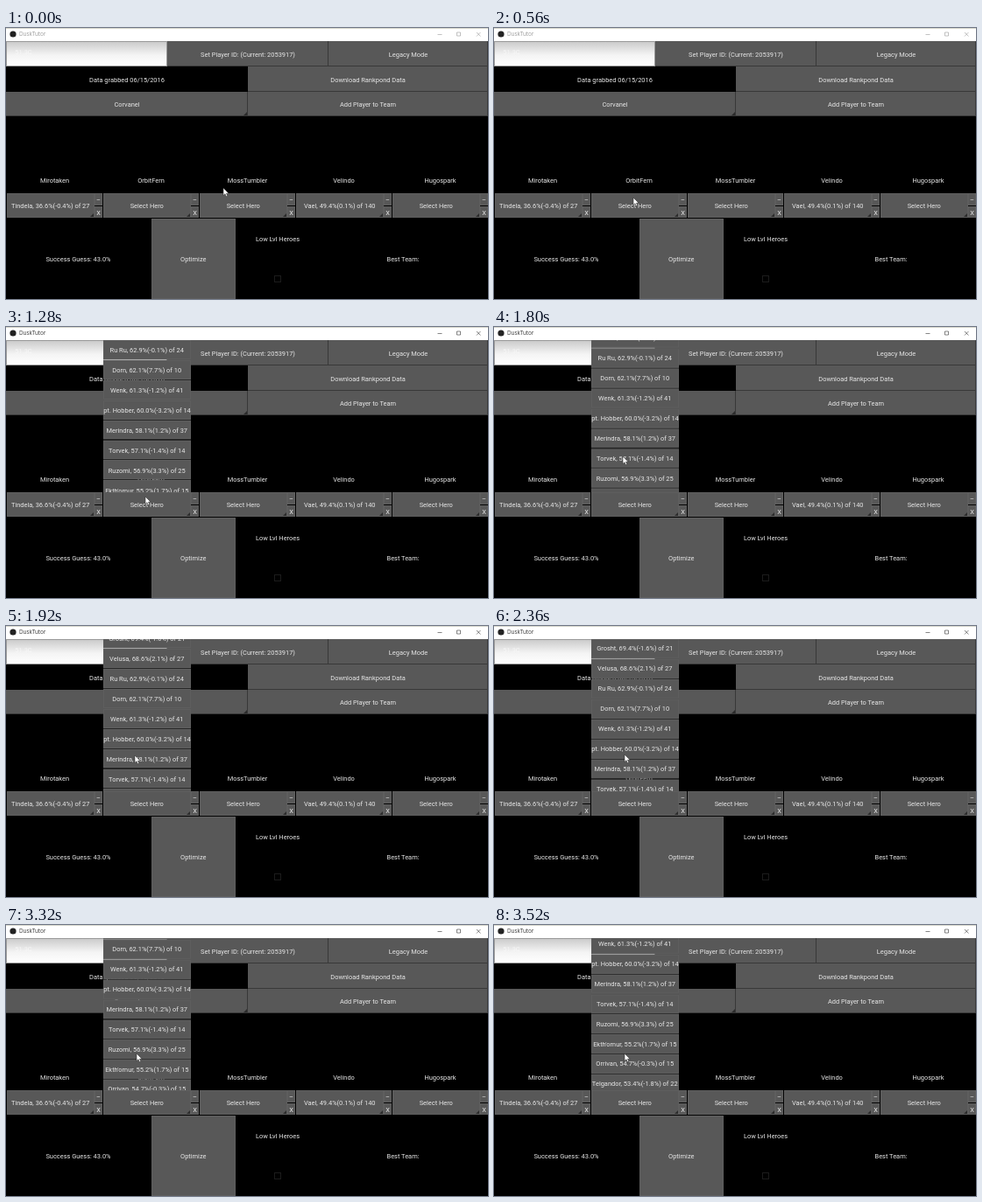
Animation of 550x310 px, one loop 3720 ms. Source, as an HTML page:

```html
<!DOCTYPE html>
<html lang="en">
<head>
<meta charset="utf-8">
<title>Team picker</title>
<style>
  html, body { margin: 0; width: 100%; height: 100%; overflow: hidden; background: #000; }
  #stage { position: relative; width: 550px; height: 310px; overflow: hidden; background: #000;
    color: #e8e8e8; font: 7.45px/1 Roboto, sans-serif; }
  #stage div { position: absolute; box-sizing: border-box; }
  .label, .button { display: flex; align-items: center; justify-content: center;
    white-space: nowrap; overflow: hidden; }
  .label span, .button span { transform: translateY(.5px); }
  .button { background: #585858; box-shadow: inset 0 0 0 1px #5e5e5e; }
  .wide { box-shadow: inset -1px -1px #383838; }
  .spinner::after { content: ""; position: absolute; right: 1px; bottom: 1px;
    border: 2px solid; border-color: transparent #2c2c2c #2c2c2c transparent; }
  .input { background: linear-gradient(#c9c9c9, #f4f4f4 55%, #fff); box-shadow: inset 0 0 0 1px #999; }
  .hint { color: #fff; opacity: .6; }
  .check { border: 1px solid #1c1c1c; }

  .bar { background: #fff; border-top: 1px solid #d9d9cf; color: #999;
    font: 6.3px/1 "Open Sans", sans-serif; animation: focus 3720ms step-end infinite; }
  .bar svg { position: absolute; left: 0; top: -1px; fill: none; stroke: currentColor; stroke-width: .6; }
  .caption { left: 15px; top: 3px; white-space: nowrap; }

  .press { animation: press 3720ms step-end infinite; }
  .drop { overflow: hidden; animation: open 3720ms step-end infinite; }
  .list { background: rgba(88, 88, 88, .45); animation: scroll 3720ms step-end infinite; }
  .pointer { left: 0; top: 0; width: 8px; height: 12px; animation: move 3720ms step-end infinite; }
  .pointer svg { display: block; overflow: visible; }

  @keyframes focus { 0% { color: #999 } 18.27%, 100% { color: #333 } }
  @keyframes press {
    0%, 20.43%, 100% { background: #585858 }
    18.27% { background: #2f97be }
  }
  @keyframes open { 0% { visibility: hidden } 20.43%, 100% { visibility: visible } }
  @keyframes scroll {
    0% { transform: translateY(0) }
    48.38% { transform: translateY(9.5px) }
    49.46% { transform: translateY(19.5px) }
    50.53% { transform: translateY(27.5px) }
    51.61% { transform: translateY(34px) }
    52.68% { transform: translateY(39px) }
    53.76% { transform: translateY(42.5px) }
    54.83% { transform: translateY(44.5px) }
    55.91% { transform: translateY(45.8px) }
    78.49% { transform: translateY(26px) }
    79.56% { transform: translateY(13px) }
    80.64% { transform: translateY(4px) }
    81.71% { transform: translateY(-2px) }
    89.24% { transform: translateY(-21.3px) }
    90.32% { transform: translateY(-33px) }
    91.39% { transform: translateY(-41px) }
    92.47% { transform: translateY(-46.5px) }
    94.62%, 100% { transform: translateY(-50.2px) }
  }
  @keyframes move {
    0% { transform: translate(248px, 183px) }
    1.07% { transform: translate(248px, 183px); animation-timing-function: steps(4, start) }
    5.37% { transform: translate(232px, 185px); animation-timing-function: steps(5, start) }
    10.75% { transform: translate(183px, 191px); animation-timing-function: steps(5, start) }
    16.12% { transform: translate(159px, 194px) }
    35.48% { transform: translate(159px, 194px); animation-timing-function: steps(11, start) }
    47.31% { transform: translate(147px, 148px) }
    63.44%, 100% { transform: translate(149px, 147px) }
  }
</style>
</head>
<body>
<div id="stage"></div>
<script>
const stage = document.getElementById("stage");

function box(kind, x, y, w, h, text = "", parent = stage) {
  const el = document.createElement("div");
  el.className = kind;
  el.style.cssText = `left:${x}px;top:${y}px;width:${w}px;height:${h}px`;
  if (text) {
    const span = document.createElement("span");
    span.textContent = text;
    el.append(span);
  }
  parent.append(el);
  return el;
}

// Title bar
box("bar", 0, 0, 550, 15).innerHTML = `
  <svg width="550" height="15">
    <circle cx="8" cy="7" r="3.6" fill="#222" stroke="none"/>
    <path d="M492.500 7.5h5M514.500 5h4v4h-4zM537 5l4.500 4.500m0-4.500l-4.500 4.500"/>
  </svg>
  <div class="caption">DuskTutor</div>`;

// Settings rows
box("input", 0, 15, 184, 29);
box("label hint", 7, 22, 26, 10, "51.3C");
box("button wide", 184, 15, 184, 29, "Set Player ID: (Current: 2053917)");
box("button wide", 368, 15, 182, 29, "Legacy Mode");
box("label", 0, 44, 276, 29, "Data grabbed 06/15/2016");
box("button wide", 276, 44, 274, 29, "Download Rankpond Data");
box("button wide spinner", 0, 73, 276, 28, "Corvanel");
box("button wide", 276, 73, 274, 28, "Add Player to Team");

// Team members
const team = [
  ["Mirotaken", "Tindela, 36.6%(-0.4%) of 27"],
  ["OrbitFern", "Select Hero"],
  ["MossTumbler", "Select Hero"],
  ["Velindo", "Vael, 49.4%(0.1%) of 140"],
  ["Hugospark", "Select Hero"]
];
team.forEach(([name, hero], i) => {
  const x = 1 + i * 110;
  box("label", x, 164, 109, 20, name);
  box("button spinner" + (i === 1 ? " press" : ""), x, 189, 99.5, 28, hero);
  box("button", x + 100, 189, 9, 13.5, "–");
  box("button", x + 100, 203.5, 9, 13.5, "X");
});

// Summary
box("label", 0, 218, 165, 92, "Success Guess: 43.0%");
box("button", 166, 218, 95.5, 92, "Optimize");
box("label", 262, 231, 96, 20, "Low Lvl Heroes");
box("check", 306, 283, 8, 8);
box("label", 357, 218, 192, 92, "Best Team:");

// Hero menu
const heroes = [
  "Grosht, 69.4%(-1.6%) of 21",
  "Velusa, 68.6%(2.1%) of 27",
  "Ru Ru, 62.9%(-0.1%) of 24",
  "Dorn, 62.1%(7.7%) of 10",
  "Wenk, 61.3%(-1.2%) of 41",
  "Cpt. Hobber, 60.0%(-3.2%) of 147",
  "Merindra, 58.1%(1.2%) of 37",
  "Torvek, 57.1%(-1.4%) of 14",
  "Ruzomi, 56.9%(3.3%) of 25",
  "Ekth'omur, 55.2%(1.7%) of 15",
  "Orrivan, 54.7%(-0.3%) of 15",
  "Telgandor, 53.4%(-1.8%) of 22"
];
const pitch = 22.9;
const drop = box("drop", 111, 15, 99.5, 174);
const list = box("list", 0, -2 * pitch, 99.5, heroes.length * pitch, "", drop);
heroes.forEach((hero, i) => box("button", 0, i * pitch, 99.5, pitch - 1, hero, list));

// Mouse pointer
box("pointer", 0, 0, 8, 12).innerHTML = `
  <svg width="8" height="12">
    <path d="M0 0v8.5l2-1.8 1.3 3 1.5-.7-1.3-2.8h2.7z" fill="#fff" stroke="#222" stroke-width=".5"/>
  </svg>`;
</script>
</body>
</html>
```
